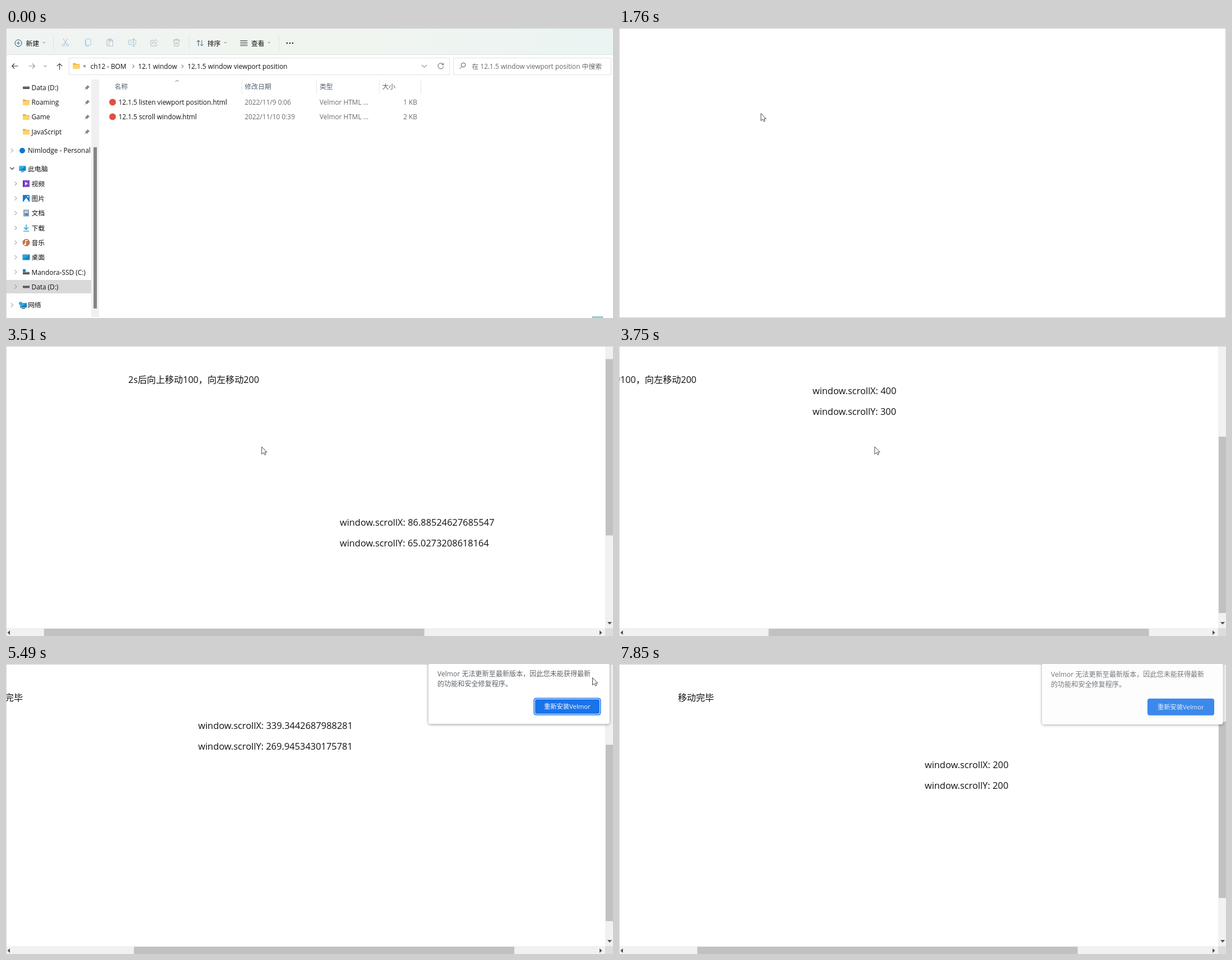
Write an HTML page with a canvas that moves like this. It is 1082 px wide and 518 px high and loops after 7880 ms.

```html
<!DOCTYPE html>
<html lang="zh">
<head>
<meta charset="utf-8">
<title>window viewport position</title>
<style>
html, body { margin: 0; width: 100%; height: 100%; overflow: hidden; background: #fff; }
canvas { display: block; }
</style>
</head>
<body>
<canvas id="stage" width="1082" height="518"></canvas>
<script>
const W = 1082, H = 518, LOOP = 7880, STEP = 10;
const g = document.getElementById('stage').getContext('2d');
const FONT = '"Open Sans", "Noto Sans CJK SC", "Noto Sans CJK", sans-serif';
const UI = 11.85, APP = 'Velmor';
const BLUE = '#1877bd', DARK = '#404040';

const clamp = (v) => Math.max(0, Math.min(1, v));
const span = (t, a, b) => clamp((t - a) / (b - a));
const smooth = (u) => u * u * (3 - 2 * u);

// cubic-bezier(.42, 0, .58, 1)
function easeInOut(x) {
  if (x <= 0 || x >= 1) return x;
  let lo = 0, hi = 1;
  for (let i = 0; i < 24; i++) {
    const s = (lo + hi) / 2, r = 1 - s;
    if (1.26 * s * r * r + 1.74 * s * s * r + s * s * s < x) lo = s; else hi = s;
  }
  return smooth(lo);
}

function box(x, y, w, h, fill, stroke) {
  if (fill) { g.fillStyle = fill; g.fillRect(x, y, w, h); }
  if (stroke) { g.strokeStyle = stroke; g.lineWidth = 1; g.strokeRect(x + .5, y + .5, w - 1, h - 1); }
}

function round(x, y, w, h, r, fill) {
  g.beginPath();
  g.roundRect(x, y, w, h, r);
  g.fillStyle = fill;
  g.fill();
}

function dot(x, y, r, fill) {
  g.beginPath();
  g.arc(x, y, r, 0, 7);
  g.fillStyle = fill;
  g.fill();
}

// y is the middle of the digits
function text(s, x, y, color = '#111', size = UI, align = 'left', weight = 400) {
  g.font = `${weight} ${size}px ${FONT}`;
  g.textAlign = align;
  g.fillStyle = color;
  g.fillText(s, x, y + size * .357);
}

function icon(x, y, d, stroke, fill, width = 1) {
  const p = new Path2D(d);
  g.save();
  g.translate(x, y);
  if (fill) { g.fillStyle = fill; g.fill(p); }
  if (stroke) { g.strokeStyle = stroke; g.lineWidth = width; g.stroke(p); }
  g.restore();
}

const RIGHT = 'M-2-3.5L1.5 0L-2 3.5', DOWN = 'M-3.5-2L0 1.5L3.5-2', UP = 'M-3 1.5L0-1.5L3 1.5';

function folder(x, y) {
  icon(x, y, 'M-6-5h4.5l1.5 1.5h6v8h-12z', null, '#e8a92e');
  icon(x, y, 'M-6-2.5h12v7.5h-12z', null, '#ffd36b');
}

function drive(x, y) {
  round(x - 6, y - 2, 12, 4.5, 1, '#545b5e');
  box(x - 5, y - 2, 10, 1, '#8e9699');
}

function pin(x, y) {
  icon(x, y, 'M1-4L4-1L2 0L0 3L-3 0L0-2zM-1.5 1.5L-4 4', '#7d858d', '#7d858d');
}

function screen(x, y) {
  box(x - 6, y - 5, 12, 8.5, '#1583c7');
  icon(x, y, 'M-6-5h12l-12 8z', null, '#37aee3');
  icon(x, y, 'M-3 5h6', '#52656f', null, 1.5);
}

function toolbar(active, selected) {
  const bg = g.createLinearGradient(0, 0, W, 0);
  bg.addColorStop(0, active ? '#eff4f3' : '#f2f2f2');
  bg.addColorStop(.5, active ? '#f1f5ef' : '#f2f2f2');
  bg.addColorStop(1, active ? '#ebf4f3' : '#f2f2f2');
  box(0, 0, W, 47, bg);
  box(0, 47, W, 1, '#dcdfde');

  icon(22, 27, 'M6 0A6 6 0 1 1-6 0A6 6 0 1 1 6 0', DARK);
  icon(22, 27, 'M-3 0H3M0-3V3', BLUE, null, 1.2);
  text('新建', 35.5, 28);
  for (const x of [84, 326, 486]) box(x, 12, 1, 28, '#dfe2e1');

  g.globalAlpha = selected ? 1 : .35;
  icon(106, 26, 'M-4-7L2.5 3M4-7L-2.5 3', DARK);
  icon(106, 26, 'M-1.5 4.5A2 2 0 1 1-5.5 4.5A2 2 0 1 1-1.5 4.5M5.5 4.5A2 2 0 1 1 1.5 4.5A2 2 0 1 1 5.5 4.5', BLUE);
  icon(146, 26, 'M-2.5-6.5h6q1.5 0 1.5 1.5v8q0 1.5-1.5 1.5h-6q-1.5 0-1.5-1.5v-8q0-1.5 1.5-1.5M-4.5-4v9q0 1.5 1.5 1.5h5', BLUE);
  icon(225, 26, 'M1-4.5h-6q-1.5 0-1.5 1.5v5q0 1.5 1.5 1.5h6M4-4.5h1q1.5 0 1.5 1.5v5q0 1.5-1.5 1.5h-1M-4-.5h5', BLUE);
  icon(225, 26, 'M.5-6.5h4M.5 6.5h4M2.5-6.5v13', DARK);
  icon(264, 26, 'M-1-4h-3q-2 0-2 2v6q0 2 2 2h7q2 0 2-2v-1', DARK);
  icon(264, 26, 'M-3 2q0-5 5-5v-3l4.5 4.5l-4.5 4.5v-3q-3 0-5 2', BLUE);
  icon(304, 26, 'M-6-4.5h12M-2-4.5q0-2.2 2-2.2t2 2.2M-4.7-4.5l1 10q.2 1 1 1h5.4q.8 0 1-1l1-10M-1.2-1.5v5M1.2-1.5v5', DARK);
  g.globalAlpha = .35;
  icon(185, 26, 'M-2-5h-3v11h3M2-5h3v2M-2-6.5h4v2.5h-4z', DARK);
  icon(185, 26, 'M-1-2.5h6.5v9h-6.5z', BLUE);
  g.globalAlpha = 1;

  icon(346, 27, 'M-3 5V-5M-6-2L-3-5L0-2', DARK);
  icon(346, 27, 'M3-5V5M0 2L3 5L6 2', BLUE);
  text('排序', 359, 28);
  icon(424, 27, 'M-6.5-4.5h13M-6.5-1.5h13M-6.5 1.5h13M-6.5 4.5h13', DARK);
  text('查看', 437, 28);
  for (const x of [67.5, 391, 469]) icon(x, 26, 'M-2.2-1L0 1L2.2-1', '#777');
  for (const x of [501, 506, 511]) dot(x, 27, 1.3, '#222');
}

function addressBar() {
  icon(16, 68, 'M5.5 0H-5M-1-4.5L-5.3 0L-1 4.5', '#333', null, 1.1);
  icon(46, 68, 'M-5.5 0H5M1-4.5L5.3 0L1 4.5', '#999', null, 1.1);
  icon(70, 68, 'M-2.5-1L0 1.2L2.5-1', '#666');
  icon(95.5, 69, 'M0 5.5V-5M-4.5-1L0-5.3L4.5-1', '#333', null, 1.1);
  box(112, 53, 679, 31, '#fff', '#e2e2e2');
  box(797, 53, 282, 31, '#fff', '#e2e2e2');
  folder(125.5, 68);
  text('«', 137.5, 67, '#333', 10);
  text('ch12 - BOM', 150.5, 69);
  text('12.1 window', 235.5, 69);
  text('12.1.5 window viewport position', 323.5, 69);
  for (const x of [227, 314.5]) icon(x, 68.5, 'M-1.5-3L1.5 0L-1.5 3', '#333');
  icon(745.5, 68, 'M-4.5-2L0 2.2L4.5-2', '#555');
  icon(775, 68, 'M4.5-2.5A5 5 0 1 0 5 .5M4.8-5.5v3.2h-3.2', '#555');
  icon(814, 68, 'M5-2A3.8 3.8 0 1 1-2.6-2A3.8 3.8 0 1 1 5-2M-1.5 1L-5.5 5', '#555');
  text('在 12.1.5 window viewport position 中搜索', 830.5, 69, '#666');
}

const places = [
  ['视频', (x, y) => { box(x - 6, y - 6, 12, 12, '#7d4bc4'); icon(x, y, 'M-2-3L3 0L-2 3z', null, '#fff'); icon(x, y, 'M-5-5V6', '#4d2a8c', null, 1.5); }],
  ['图片', (x, y) => { box(x - 6, y - 6, 12, 12, '#1679c8'); icon(x, y, 'M-5 6L0-1L5 6z', null, '#fff'); dot(x + 3, y - 3, 1.3, '#fff'); }],
  ['文档', (x, y) => { box(x - 5, y - 6, 10, 12, '#8c9fb8'); icon(x, y, 'M-3-3h6M-3-1h6', '#fff'); box(x - 1, y + 1, 4, 3, '#4a73a8'); }],
  ['下载', (x, y) => icon(x, y, 'M0-6V3M-4-1L0 3L4-1M-5 6H5', '#1a9fc4', null, 1.4)],
  ['音乐', (x, y) => { dot(x, y, 6.5, '#bd7752'); icon(x, y, 'M-1 3V-4L3-3', '#fff', null, 1.3); dot(x - 2, y + 3, 1.7, '#fff'); }],
  ['桌面', (x, y) => { round(x - 6.5, y - 5, 13, 10, 1, '#1486c9'); icon(x, y, 'M-6-4.5H6L-6 4z', null, '#27a6dc'); }],
  ['Mandora-SSD (C:)', (x, y) => { box(x - 6, y - 5, 5, 5, '#1583c7'); drive(x, y + 2); }],
  ['Data (D:)', drive],
];

function sidebar() {
  box(152, 92, 14, 424, '#f0f0f0');
  box(156, 213, 6, 288, '#858585');
  box(1, 450, 151, 24, '#d9d9d9');
  ['Data (D:)', 'Roaming', 'Game', 'JavaScript'].forEach((name, i) => {
    const y = 106.5 + i * 26.35;
    (i ? folder : drive)(36, y);
    text(name, 45.5, y);
    pin(144.5, y);
  });
  icon(11, 219, RIGHT, '#777');
  dot(29, 219, 5, '#0f78d1');
  text('Nimlodge - Personal', 39, 219);
  icon(11, 251, DOWN, '#333', null, 1.1);
  screen(29.5, 251.5);
  text('此电脑', 39, 252);
  places.forEach(([name, draw], i) => {
    const y = 278 + i * 26.3;
    icon(17.5, y, RIGHT, '#777');
    draw(36, y);
    text(name, 45.5, y + .5);
  });
  icon(11, 495, RIGHT, '#777');
  screen(31, 496);
  dot(26, 492, 3, '#3d9fd0');
  text('网络', 39, 495);
}

function fileList(rowFill, rowEdge) {
  const head = '#52606f', sub = '#6b6b6b';
  icon(305, 94.5, UP, '#777');
  text('名称', 193.5, 104.5, head);
  text('修改日期', 425.5, 104.5, head);
  text('类型', 559, 104.5, head);
  text('大小', 670.5, 104.5, head);
  for (const x of [420, 553, 665, 739]) box(x, 92, 1, 26, '#e6e6e6');
  if (rowFill) box(180, 147, 557, 22, rowFill, rowEdge);
  [['12.1.5 listen viewport position.html', '2022/11/9 0:06', '1 KB'],
   ['12.1.5 scroll window.html', '2022/11/10 0:39', '2 KB']].forEach(([name, date, size], i) => {
    const y = 132.5 + i * 26;
    dot(190, y, 6, '#dd5144');
    text(name, 200.5, y);
    text(date, 425.5, y, sub);
    text(APP + ' HTML ...', 559, y, sub);
    text(size, 733, y, sub, UI, 'right');
  });
  box(1045, 515, 19, 3, '#d9f1f6', '#62b8ca');
}

function edges() {
  box(0, 0, W, 1, '#cdcdcd');
  box(0, 0, 1, H, '#d4d4d4');
}

function explorer(t) {
  const hover = t > 600, selected = t >= 690;
  box(0, 0, W, H, '#fff');
  toolbar(t < 1080, selected);
  addressBar();
  sidebar();
  fileList(selected ? '#cce8ff' : hover ? '#e5f3ff' : null, selected ? '#99d1ff' : null);
  edges();
}

// positions snap to device pixels
const snap = (v) => Math.fround(Math.round(v * 1.83) / 1.83);

function scrollAt(t) {
  const a = easeInOut(span(t, 3402.6, 3735.6)), b = easeInOut(span(t, 5400, 5636));
  return [snap(400 * a - 200 * b), snap(300 * a - 100 * b)];
}

function scrollbars(sx, sy) {
  const arrow = '#505050';
  box(1068, 1, 14, 503, '#f1f1f1');
  box(1, 504, 1067, 14, '#f1f1f1');
  box(1068, 504, 14, 14, '#dcdcdc');
  const end = 300 + sy * .59, top = Math.max(1, end - 315);
  box(1069, top, 13, end - top, '#c1c1c1');
  box(12.6 + sx * .635, 505, 678, 13, '#c1c1c1');
  icon(1076, 495, 'M-4-2H4L0 2.5z', null, arrow);
  icon(5, 512, 'M2-4V4L-2.5 0z', null, sx ? arrow : '#a3a3a3');
  icon(1060, 512, 'M-2-4V4L2.5 0z', null, arrow);
}

function page(t) {
  const [sx, sy] = scrollAt(t);
  const label = t < 3360 ? '1.5s后移动到(300,400)视口'
    : t < 5360 ? '2s后向上移动100，向左移动200' : '移动完毕';
  box(0, 0, W, H, '#fff');
  text(label, 305 - sx, 60, '#111', 16.1);

  const size = 16.4, lineX = 'window.scrollX: ' + sx, lineY = 'window.scrollY: ' + sy;
  g.font = `400 ${size}px ${FONT}`;
  const left = 819.6 - sx - Math.max(g.measureText(lineX).width, g.measureText(lineY).width) / 2;
  text(lineX, left, 379.8 - sy, '#111', size);
  text(lineY, left, 417.2 - sy, '#111', size);
  edges();
  scrollbars(sx, sy);
}

function notice(t) {
  const closing = t >= 7820;
  const panel = () => round(753, -10, 322.5, 117, 4, '#fff');
  g.save();
  g.globalAlpha = closing ? .87 : span(t, 3800, 3960);
  if (closing) g.translate(1, .7);
  g.shadowColor = 'rgba(0,0,0,.42)';
  g.shadowBlur = 5;
  g.shadowOffsetY = 1;
  panel();
  // cover the shadow that shows through while translucent
  g.shadowColor = 'transparent';
  panel();
  text(APP + ' 无法更新至最新版本，因此您未能获得最新', 769, 17.5, '#5f6368', 12.1);
  text('的功能和安全修复程序。', 769, 35.5, '#5f6368', 12.1);
  if (closing) {
    round(941, 61, 119, 30, 4, '#1f78e8');
  } else {
    round(940.5, 60.5, 120, 31, 4.5, '#1a73e8');
    round(942, 62, 117, 28, 3.5, '#fff');
    round(943, 63, 115, 26, 3, '#1a73e8');
  }
  text('重新安装' + APP, 1000.3, 76.2, '#fff', 11.3, 'center', 500);
  g.restore();
}

// time, x, y of the pointer tip
const track = [
  [30, 1024, 512], [300, 760, 330], [780, 257, 153], [850, 252.5, 152],
  [2500, 252.5, 152], [2530, 256.5, 152], [3260, 455.3, 179.5],
  [4200, 455.3, 179.5], [4230, 455.3, 180.2], [4900, 1045, 24],
  [5940, 1045, 24], [6060, 1062, 30], [6220, 1025, 47], [6320, 1025, 47],
  [6710, 1005, 52], [6950, 1050, 170], [7520, 1022, 512],
];

function pointer(t) {
  if (t < 30 || t >= 7575) return;
  let i = 1;
  while (i < track.length - 1 && track[i][0] < t) i++;
  const [t0, x0, y0] = track[i - 1], [t1, x1, y1] = track[i];
  const u = smooth(span(t, t0, t1));
  const x = x0 + (x1 - x0) * u, y = y0 + (y1 - y0) * u;
  if ((t >= 690 && t < 780) || (t >= 1080 && t < 1220)) dot(x, y + 2, 10, 'rgba(238,230,50,.75)');
  icon(x, y, 'M.5.5V13.7L3.6 10.9L5.7 15L7.9 14L5.8 10.1H9.8z', '#444', '#fff');
}

function draw(t) {
  if (t < 1900) {
    explorer(t);
    const u = span(t, 1380, 1560);
    if (u > 0) {
      const s = .9 + .1 * (1 - (1 - u) ** 3);
      g.globalAlpha = u;
      box(W / 2 * (1 - s), H / 2 * (1 - s), W * s, H * s, '#fff', '#cdcdcd');
      g.globalAlpha = 1;
    }
  } else {
    page(t);
    if (t > 3800) notice(t);
  }
  pointer(t);
}

const start = performance.now();
function tick() {
  const t = (performance.now() - start) % LOOP;
  draw(Math.floor(t / STEP) * STEP);
  requestAnimationFrame(tick);
}
tick();
</script>
</body>
</html>
```
